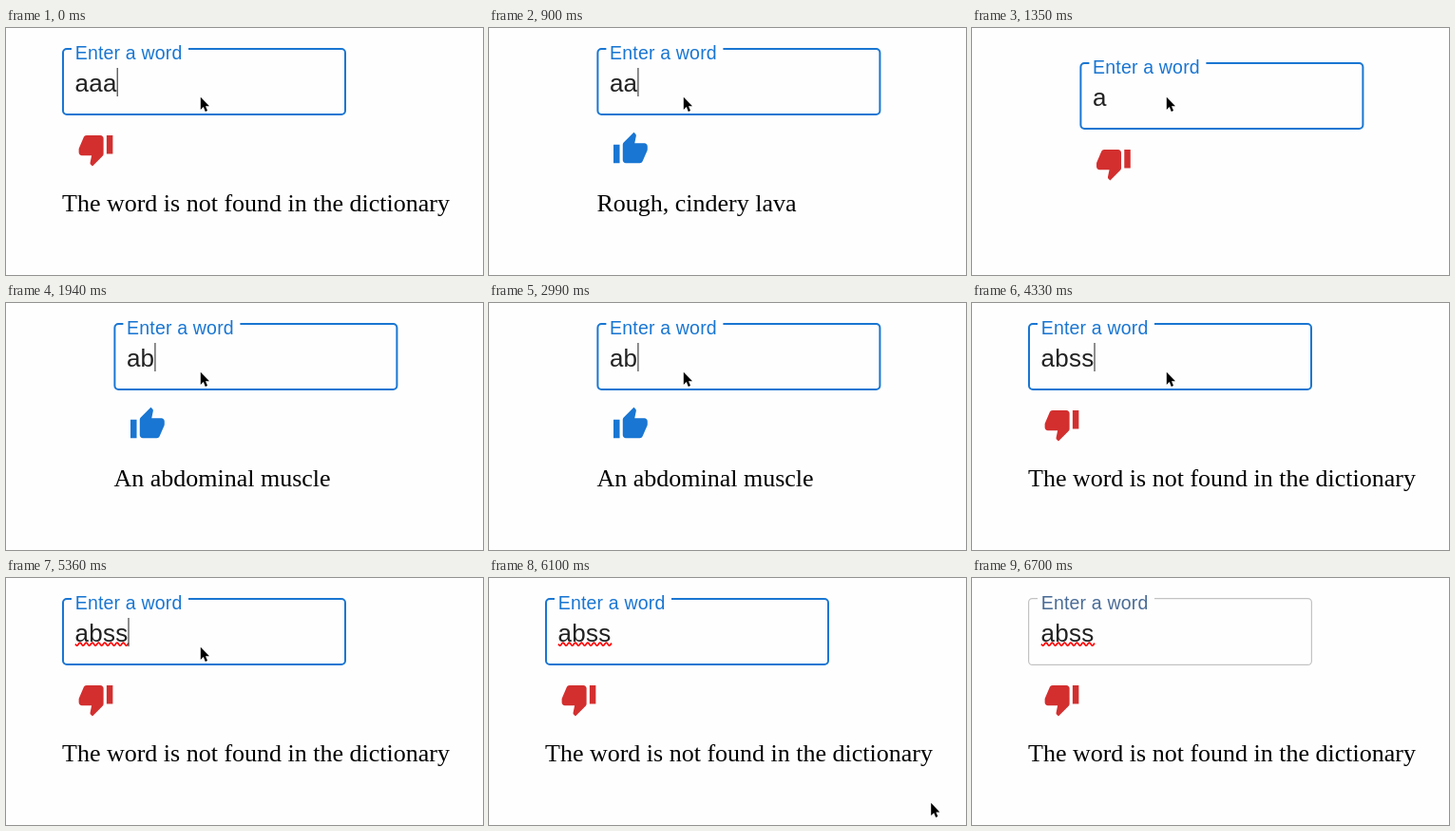
These frames come from a looping animation (502 by 260 pixels, 6.72 s). An HTML page:

```html
<!DOCTYPE html>
<html lang="en">
<head>
<meta charset="utf-8">
<title>Word check</title>
<style>
  html, body { margin: 0; width: 100%; height: 100%; overflow: hidden; background: #fefefe; }
  svg { display: block; width: 502px; height: 260px; }
  text { font-kerning: none; white-space: pre; }
  .label, .word { font-family: "Liberation Sans", Arial, sans-serif; }
  .label { font-size: 19.5px; letter-spacing: .00938em; }
  .word { font-size: 26px; letter-spacing: .00938em; fill: #222; }
  .meaning { font: 26px "Liberation Serif", "Times New Roman", serif; fill: #000; }
</style>
</head>
<body>
<svg viewBox="0 0 502 260">
  <g id="form">
    <path id="outline" fill="none"/>
    <text id="label" class="label" x="72.7" y="33">Enter a word</text>
    <text id="word" class="word" x="72.5" y="66.6"></text>
    <path id="squiggle" fill="none" stroke="#f00" stroke-width="1.7"/>
    <rect id="caret" y="42" width="1.2" height="30" fill="#444"/>
    <path id="thumb" transform="translate(75 108.2) scale(1.625)"/>
    <text id="meaning" class="meaning" x="59" y="193.3"></text>
  </g>
  <path id="pointer" d="M0 0V13.2L3 10.4L5 15.2L7.2 14.2L5.2 9.6H9.2Z"
        stroke="#fff" stroke-width="1.6" paint-order="stroke" stroke-linejoin="round"/>
</svg>
<script>
const LOOP = 6720, BLUR = 6700, MISSPELT = 5360;
const BLUE = "#1976d2", RED = "#d32f2f";
const NOT_FOUND = "The word is not found in the dictionary";
const UP = "M1 21h4V9H1v12zm22-11c0-1.1-.9-2-2-2h-6.31l.95-4.57.03-.32c0-.41-.17-.79-.44-1.06L14.17 1 7.59 7.59C7.22 7.95 7 8.45 7 9v10c0 1.1.9 2 2 2h9c.83 0 1.54-.5 1.84-1.22l3.02-7.05c.09-.23.14-.47.14-.73v-2z";
const DOWN = "M15 3H6c-.83 0-1.54.5-1.84 1.22l-3.02 7.05c-.09.23-.14.47-.14.73v2c0 1.1.9 2 2 2h6.31l-.95 4.57-.03.32c0 .41.17.79.44 1.06L9.83 23l6.59-6.59c.36-.36.58-.86.58-1.41V5c0-1.1-.9-2-2-2zm4 0v12h4V3h-4z";

// The form is centred, so a long message pushes it to the left.
const entries = [
  { at: 0, word: "aaa", meaning: NOT_FOUND },
  { at: 600, word: "aa", meaning: "Rough, cindery lava", good: true },
  { at: 1200, word: "a", meaning: "" },
  { at: 1940, word: "ab", meaning: "An abdominal muscle", good: true },
  { at: 3290, word: "abs", meaning: "Abdominal muscles", good: true },
  { at: 4330, word: "abss", meaning: NOT_FOUND }
];

const blinks = [0, 450, 900, 1350, 1940, 2540, 2990, 3740, 4180, 4770, 5220, 5810, 6250, 6700]
  .map((at, i) => ({ at, on: i % 2 === 0 }));
// Typing the single letter shows the caret again before its next blink.
blinks.splice(3, 0, { at: 1200, on: true });

const pointerStops = [
  { at: 0, x: 204.8, y: 72.7 },
  { at: 5660, x: 222.2, y: 74.7 },
  { at: 5810, x: 405, y: 175.8 },
  { at: 5960, x: 452.2, y: 181.6 },
  { at: 6100, x: 465.2, y: 236.8 },
  { at: 6250, x: 520, y: 280 }
];

const el = id => document.getElementById(id);
const set = (id, attrs) => {
  for (const key in attrs) el(id).setAttribute(key, attrs[key]);
};
const show = (id, on) => set(id, { visibility: on ? "visible" : "hidden" });
const current = (list, t) => list.filter(item => item.at <= t).pop();

function outline(width) {
  const h = width / 2, r = 4;
  const left = 59 + h, right = 358 - h, top = 21 + h, bottom = 92 - h;
  const arc = (x, y) => `A${r} ${r} 0 0 1 ${x} ${y}`;
  return `M192 ${top}H${right - r}${arc(right, top + r)}V${bottom - r}${arc(right - r, bottom)}` +
    `H${left + r}${arc(left, bottom - r)}V${top + r}${arc(left + r, top)}H69`;
}

function wave(from, to) {
  const points = [];
  for (let x = from; x <= to; x += 0.5) {
    points.push(`${x} ${(69.6 + 1.5 * Math.sin((x - from) / 6.5 * 2 * Math.PI)).toFixed(2)}`);
  }
  return "M" + points.join("L");
}

function draw(t) {
  const entry = current(entries, t);
  const focused = t < BLUR;
  const dx = entry.meaning === NOT_FOUND ? 0 : 54.4;
  const dy = entry.meaning ? 0 : 15;
  const width = focused ? 2 : 1.2;
  const stop = current(pointerStops, t);

  set("form", { transform: `translate(${dx} ${dy})` });
  set("outline", { d: outline(width), "stroke-width": width, stroke: focused ? BLUE : "#c2c2c2" });
  set("label", { fill: focused ? BLUE : "#4a6c96" });
  set("thumb", { d: entry.good ? UP : DOWN, fill: entry.good ? BLUE : RED });
  el("word").textContent = entry.word;
  el("meaning").textContent = entry.meaning;
  set("caret", { x: 72.5 + el("word").getComputedTextLength() });
  show("caret", current(blinks, t).on);
  show("squiggle", t >= MISSPELT);
  set("pointer", { transform: `translate(${stop.x} ${stop.y})` });
}

set("squiggle", { d: wave(73, 129) });
const start = performance.now();
function tick() {
  draw((performance.now() - start) % LOOP);
  requestAnimationFrame(tick);
}
tick();
</script>
</body>
</html>
```
